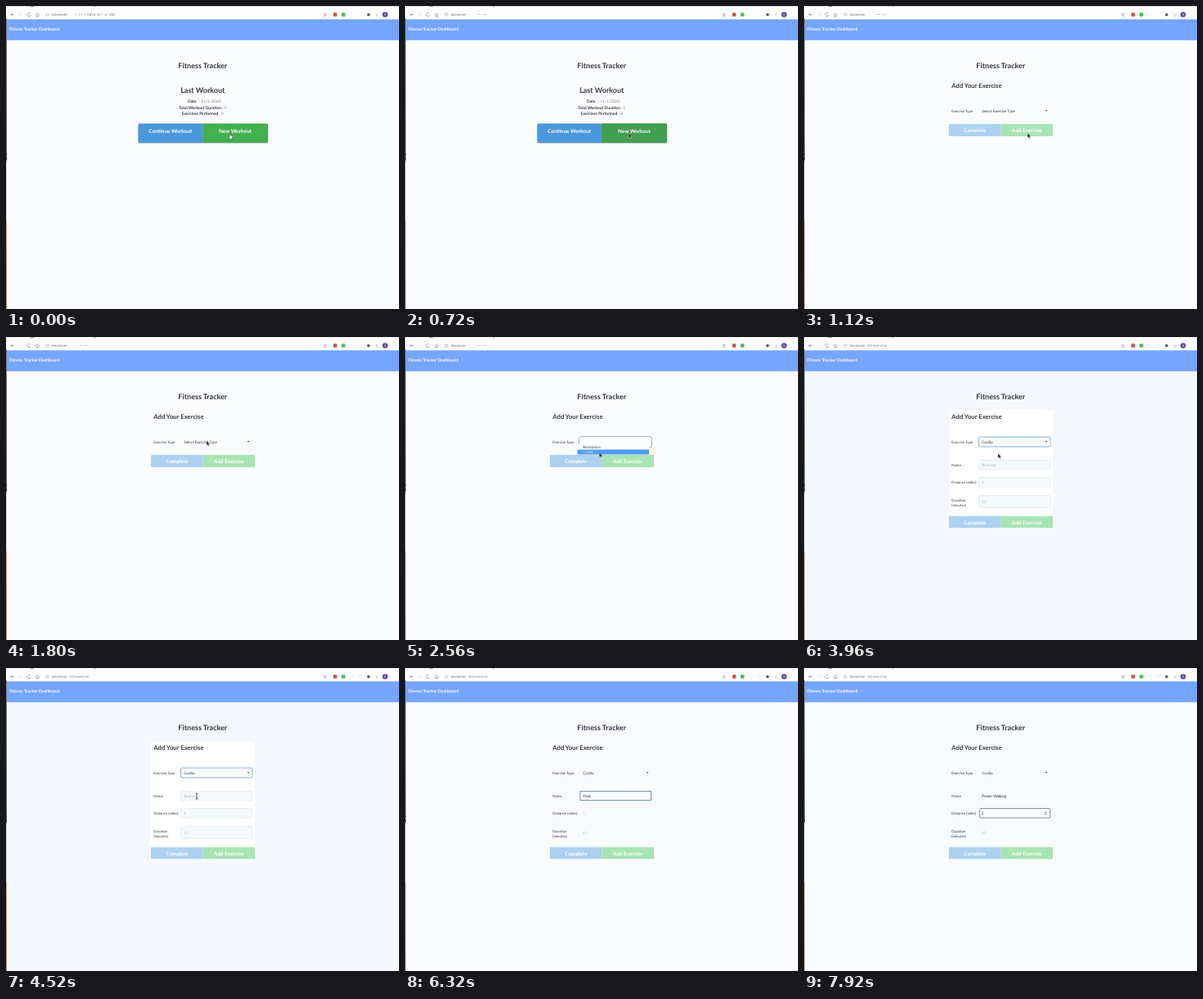
An HTML page that plays this animation: 480x370 px, repeating every 8 s.

```html
<!DOCTYPE html>
<html lang="en">
<head>
<meta charset="utf-8">
<title>Fitness Tracker</title>
<style>
  html, body { margin: 0; width: 100%; height: 100%; overflow: hidden; background: #fbfcfe; }
  svg { display: block; width: 480px; height: 370px; }
  text { font-family: Lato, sans-serif; font-size: 4.6px; fill: #34373b; text-rendering: geometricPrecision; white-space: pre; }
  .bold { font-weight: 700; }
  .mid { text-anchor: middle; }
  .h1 { font-size: 9px; font-weight: 700; }
  .h2 { font-size: 7.7px; font-weight: 700; }
  .stat { font-size: 4.9px; font-weight: 700; }
  .thin { font-weight: 400; fill: #85888c; }
  .label { font-size: 4.4px; }
  .btn { font-size: 6.4px; font-weight: 700; fill: #fff; text-anchor: middle; }
  .white { fill: #fff; }
  .hint { fill: #a9b2ba; }
  .url { font-family: Roboto, sans-serif; font-size: 4.4px; fill: #74777c; }
  .line { fill: none; stroke: #85888d; stroke-width: .7; }

  /* "after" uses visibility and "before" opacity, so both fit on one element */
  .t { animation: 8s step-end infinite; }
  @keyframes before-click { 0% { opacity: 1 } 6%, 100% { opacity: 0 } }
  @keyframes after-click { 0% { visibility: hidden } 6%, 100% { visibility: visible } }
  @keyframes before-load { 0% { opacity: 1 } 12.5%, 100% { opacity: 0 } }
  @keyframes after-load { 0% { visibility: hidden } 12.5%, 100% { visibility: visible } }
  @keyframes before-open { 0% { opacity: 1 } 24.5%, 100% { opacity: 0 } }
  @keyframes after-open { 0% { visibility: hidden } 24.5%, 100% { visibility: visible } }
  @keyframes before-pick { 0% { opacity: 1 } 48%, 100% { opacity: 0 } }
  @keyframes after-pick { 0% { visibility: hidden } 48%, 100% { visibility: visible } }
  @keyframes before-focus { 0% { opacity: 1 } 59.5%, 100% { opacity: 0 } }
  @keyframes after-focus { 0% { visibility: hidden } 59.5%, 100% { visibility: visible } }
  @keyframes before-type { 0% { opacity: 1 } 66.5%, 100% { opacity: 0 } }
  @keyframes before-tab { 0% { opacity: 1 } 97.5%, 100% { opacity: 0 } }
  @keyframes after-tab { 0% { visibility: hidden } 97.5%, 100% { visibility: visible } }

  @keyframes tint {
    0% { fill: #fbfcfe } 41.5% { fill: #f8fcff } 48% { fill: #f4f8fd }
    59.5% { fill: #fafbff } 87% { fill: #f8fcff } 100% { fill: #f8fcff }
  }
  @keyframes highlight {
    0%, 25.5% { opacity: 0; transform: translateY(-6px) }
    27% { opacity: 1; transform: translateY(-6px) }
    30%, 100% { opacity: 1; transform: none }
  }
  @keyframes lower { 0% { transform: none } 48%, 100% { transform: translateY(74.4px) } }
  #pointer { animation: wander 8s ease-in-out infinite; }
  @keyframes wander {
    0%, 14% { transform: translate(273px, 155px) }
    22%, 26% { transform: translate(245px, 126.5px) }
    33%, 48.5% { transform: translate(237px, 141.5px) }
    56%, 100% { transform: translate(233px, 156.5px) }
  }
  @keyframes before-field { 0% { opacity: 1 } 54%, 100% { opacity: 0 } }
  @keyframes after-field { 0% { visibility: hidden } 54%, 100% { visibility: visible } }
</style>
</head>
<body>
<svg viewBox="0 0 480 370">
  <defs>
    <linearGradient id="edge" x1="0" y1="0" x2="0" y2="1">
      <stop offset="0" stop-color="#77777c"/>
      <stop offset=".48" stop-color="#55555a"/>
      <stop offset=".5" stop-color="#c9ccd0"/>
      <stop offset=".69" stop-color="#c9ccd0"/>
      <stop offset=".7" stop-color="#b3967f"/>
      <stop offset="1" stop-color="#a88a74"/>
    </linearGradient>
  </defs>
  <rect class="t" style="animation-name:tint" width="480" height="370" fill="#fbfcfe"/>

  <!-- browser bar -->
  <rect width="480" height="16.5" fill="#fdfdfe"/>
  <path d="M0 .3H480" stroke="#d7d9dd" stroke-width=".6"/>
  <path d="M30 .3h4M107.500 .3h1.500" stroke="#555" stroke-width=".8"/>
  <path class="line" d="M10.300 10.500H6m1.700-1.700L6 10.500l1.700 1.700"/>
  <path class="line" opacity=".3" d="M16.500 10.500H20"/>
  <path class="line" d="M29.800 9.400a2.100 2.100 0 1 0 .2 1.600M36.300 10.700l2.200-2 2.200 2M37 10.500v2.200h3v-2.200"/>
  <circle class="line" cx="50.500" cy="10.500" r="1.700" opacity=".7"/>
  <text class="url" x="56" y="12">devserver</text>
  <g class="t" style="animation-name:before-click" opacity=".65">
    <text class="url" x="77" y="12">:  ·   | · | / · | ?id=4 · b7 · e · 20c</text>
  </g>
  <text class="url t" style="animation-name:after-click,before-pick" x="88" y="12" opacity=".7">•·•·  •·•</text>
  <text class="url t" style="animation-name:after-pick" x="77" y="12" opacity=".8">:80/exercise</text>
  <path d="M389.700 8.500l.6 1.400 1.500.1-1.200 1 .4 1.500-1.300-.8-1.300.8.4-1.500-1.200-1 1.500-.1z" class="line" style="stroke-width:.5"/>
  <rect x="399.800" y="8.300" width="4.400" height="4.400" fill="#c9514d"/>
  <rect x="409.800" y="8.300" width="4.600" height="4.400" fill="#4fba5f"/>
  <g class="line t" style="animation-name:after-pick" opacity=".5">
    <circle cx="422.500" cy="10.500" r="1.900" stroke="#d9dce0"/><circle cx="432.500" cy="10.500" r="1.900" stroke="#d9dce0"/>
  </g>
  <rect x="441.200" y="9" width="3.300" height="3.300" rx=".8" fill="#5b5e63"/>
  <path class="line" d="M452 10h2.500M452 12h2.500" opacity=".7"/>
  <circle cx="463" cy="10.500" r="3.300" fill="#694ba6"/>
  <rect x="462.200" y="9.500" width="1.600" height="2" fill="#b5a4d6"/>

  <!-- page header -->
  <rect y="16.300" width="480" height="25.200" fill="#74a5ff"/>
  <path d="M0 41.300H480" stroke="#6796ec" stroke-width=".5"/>
  <text class="bold white" x="4" y="29.600" style="font-size:5.250px">Fitness Tracker Dashboard</text>
  <rect y="15" width="1" height="355" fill="url(#edge)"/>
  <path d="M.5 180v2M.5 185v3" stroke="#222"/>
  <text class="h1 mid" x="240.300" y="76">Fitness Tracker</text>

  <!-- last workout -->
  <g class="t" style="animation-name:before-load">
    <text class="h1 mid" x="240.300" y="106.200">Last Workout</text>
    <text class="stat" x="222" y="117.700">Date <tspan class="thin" dx="2">: 11/1/2020</tspan></text>
    <text class="stat mid" x="240.300" y="125.600">Total Workout Duration <tspan class="thin">: 0</tspan></text>
    <text class="stat mid" x="240.300" y="133.200">Exercises Performed <tspan class="thin">: 0</tspan></text>
    <rect x="161.500" y="144.300" width="158.500" height="23.500" rx="1.500" fill="#7d8791" opacity=".6"/>
    <path d="M240.500 143.500V167H163q-1.500 0-1.500-1.500V145q0-1.500 1.500-1.500z" fill="#4a98db"/>
    <path id="new" d="M240.500 143.500V167h78q1.500 0 1.500-1.500V145q0-1.500-1.500-1.500z" fill="#42b14f"/>
    <path class="t" style="animation-name:after-click" d="M240.500 143.500V167h78q1.500 0 1.500-1.500V145q0-1.500-1.500-1.500z" fill="#429e50"/>
    <text class="btn" x="200.800" y="154.500">Continue Workout</text>
    <text class="btn" x="280" y="154.500">New Workout</text>
  </g>

  <!-- exercise form -->
  <g class="t" style="animation-name:after-load">
    <g class="t" style="animation-name:after-pick,before-focus">
      <rect x="177" y="89" width="127" height="145" rx="1.500" fill="#fff"/>
      <g fill="#f4f9fc" stroke="#e3ecf2" stroke-width=".8">
        <rect x="213.500" y="150.500" width="87.500" height="11.500" rx="1.500"/>
        <rect x="213.500" y="171.500" width="87.500" height="11.500" rx="1.500"/>
        <rect x="213.500" y="193.500" width="87.500" height="15" rx="1.500"/>
      </g>
      <rect x="213.500" y="122" width="87.500" height="12" rx="2" fill="#f6fafd" stroke="#86b4d6"/>
    </g>
    <text class="h2" x="180.300" y="100">Add Your Exercise</text>
    <text class="label" x="180.300" y="130">Exercise Type</text>
    <text class="t" style="animation-name:before-open" x="217.300" y="129.900">Select Exercise Type</text>
    <path class="t" style="animation-name:before-open" d="M294.500 127h3l-1.500 1.800z" fill="#555"/>

    <g class="t" style="animation-name:lower">
      <path d="M240.500 144V159H178.500q-1.500 0-1.500-1.500v-12q0-1.500 1.500-1.500z" fill="#add1f0"/>
      <path d="M240.500 144V159h62q1.500 0 1.500-1.500v-12q0-1.500-1.500-1.500z" fill="#a9e4b5"/>
      <text class="btn" x="209" y="154.400">Complete</text>
      <text class="btn" x="272.200" y="154.400">Add Exercise</text>
    </g>

    <!-- open list -->
    <g class="t" style="animation-name:after-open,before-pick">
      <rect x="212.500" y="121.500" width="89" height="13.500" rx="3" fill="#fbfdff" stroke="#8c98a6" stroke-width=".8"/>
      <rect x="210.500" y="131" width="87.500" height="12.800" fill="#fbfdff"/>
      <rect x="210.500" y="137.500" width="87.500" height="6" fill="#4f9cf3" style="animation:highlight 8s step-end infinite"/>
      <text x="217.300" y="135.900">Resistance</text>
      <text x="217.300" y="142" style="fill:#e2eefb">Cardio</text>
    </g>

    <!-- cardio fields -->
    <g class="t" style="animation-name:after-pick">
      <text x="217.300" y="129.900">Cardio</text>
      <path d="M294.500 127h3l-1.500 1.800z" fill="#555"/>
      <text class="label" x="180.300" y="157.800">Name</text>
      <text class="label" x="180.300" y="179.200">Distance (miles)</text>
      <text class="label" x="180.300" y="201">Duration</text>
      <text class="label" x="180.300" y="206.600">(minutes)</text>
      <rect class="t" style="animation-name:after-focus,before-tab" x="214" y="150.500" width="86.500" height="11" fill="#fdfeff" stroke="#7098a8"/>
      <text class="hint t" style="animation-name:before-type" x="217.300" y="157.900">Running</text>
      <text class="hint t" style="animation-name:before-tab" x="217.300" y="179.300">1</text>
      <text class="hint" x="217.300" y="202.600">15</text>
      <text id="typed" x="217.300" y="157.900" style="fill:#1f2226"></text>
      <g class="t" style="animation-name:after-tab">
        <rect x="214.500" y="171.500" width="86" height="11.500" rx="1" fill="#fdfeff" stroke="#858c9a"/>
        <path d="M218 175v4.600" stroke="#333" stroke-width=".7"/>
        <path d="M294 176.700l1.200-1.500 1.200 1.500zM294 178l1.200 1.500 1.200-1.500z" fill="#555"/>
      </g>
    </g>
  </g>

  <!-- mouse -->
  <g id="pointer">
    <path class="t" style="animation-name:before-click" d="M.2 .5q.8-.7 1.100 .4v2l2.200.6q.7.300.5 1.200L3.400 7.500H.4L-1.700 4.600q.3-.9 1.200-.1L0 5z" fill="#fff" stroke="#333" stroke-width=".6"/>
    <g class="t" style="animation-name:after-click,before-field">
      <path d="M0 0V6l1.400-1.200L2.300 7l1-.4L2.400 4.400h1.800z" fill="#111" stroke="#fff" stroke-width=".4"/>
    </g>
    <g class="t" style="animation-name:after-field,before-type">
      <path d="M-1.300-3.300h2.600M0-3.300V3.300M-1.300 3.300h2.600" fill="none" stroke="#333" stroke-width=".8"/>
    </g>
  </g>
</svg>
<script>
  const LOOP = 8000;
  const phrase = 'Power Walking';
  const field = document.getElementById('typed');
  const keyTime = i => i === 0 ? 5320 : i < 3 ? 6000 + i * 120 : 6400 + (i - 3) * 125;

  function draw() {
    const time = performance.now() % LOOP;
    const count = [...phrase].filter((_, i) => time >= keyTime(i)).length;
    const caret = time >= 4760 && time < 7800 ? '|' : '';
    field.textContent = count ? phrase.slice(0, count) + caret : '';
    requestAnimationFrame(draw);
  }
  draw();
</script>
</body>
</html>
```
